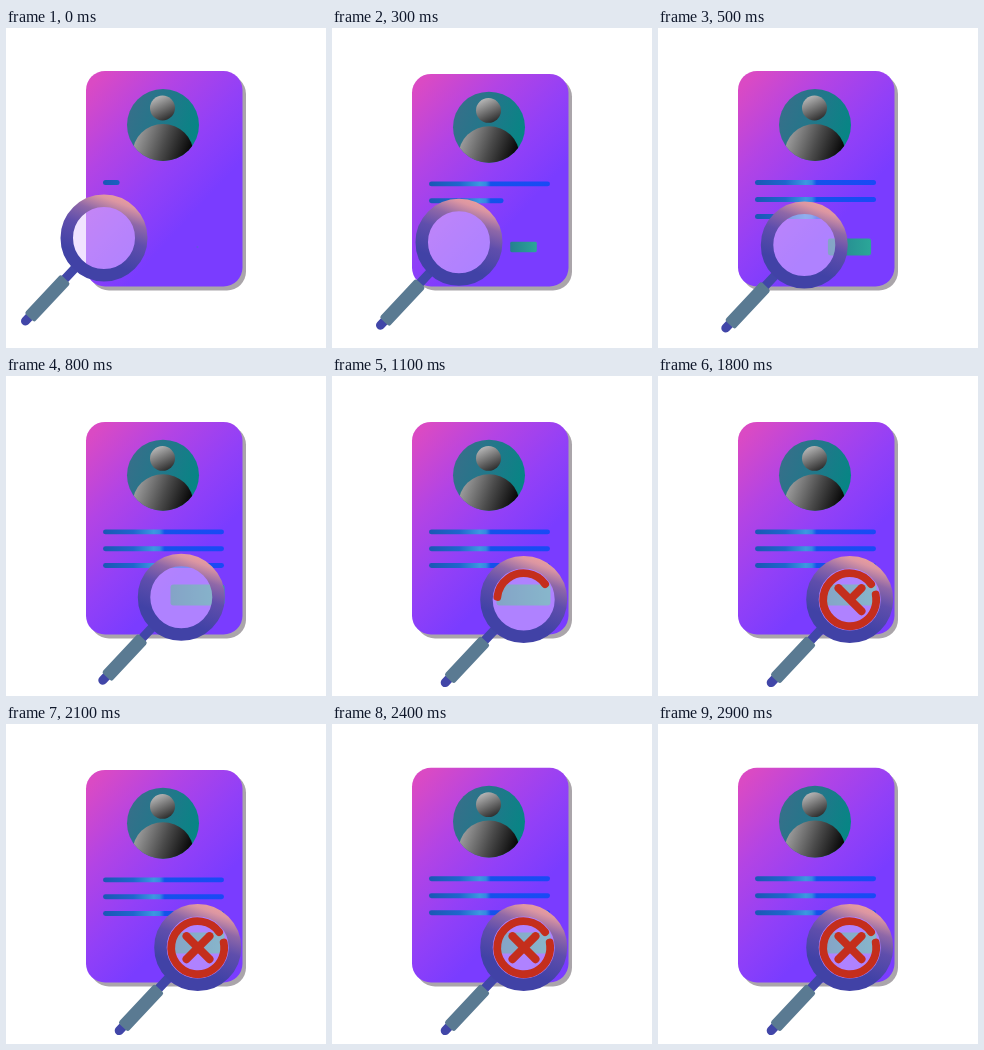
An HTML page with a canvas that plays this animation: 320x320 px, repeating every 3000 ms.

```html
<!DOCTYPE html>
<html lang="en">
<head>
<meta charset="utf-8">
<title>Profile check</title>
<style>
html, body { margin: 0; width: 100%; height: 100%; overflow: hidden; background: #fff; }
canvas { display: block; width: 100vw; height: 100vh; object-fit: contain; }
</style>
</head>
<body>
<canvas id="stage" width="320" height="320"></canvas>
<script>
const ctx = document.getElementById('stage').getContext('2d');
const LOOP = 3000, STEP = 100, TAU = Math.PI * 2;

const progress = (t, start, length) => Math.min(1, Math.max(0, (t - start) / length));
const mix = (a, b, p) => a + (b - a) * p;

function gradient(x0, y0, x1, y1, ...stops) {
  const g = ctx.createLinearGradient(x0, y0, x1, y1);
  stops.forEach(([at, color]) => g.addColorStop(at, color));
  return g;
}

function box(x, y, w, h, r, fill) {
  ctx.beginPath();
  ctx.roundRect(x, y, w, h, r);
  ctx.fillStyle = fill;
  ctx.fill();
}

function disc(x, y, r, fill) {
  ctx.beginPath();
  ctx.arc(x, y, r, 0, TAU);
  ctx.fillStyle = fill;
  ctx.fill();
}

function line(x0, y0, x1, y1, width, color) {
  ctx.beginPath();
  ctx.moveTo(x0, y0);
  ctx.lineTo(x1, y1);
  ctx.lineWidth = width;
  ctx.lineCap = 'round';
  ctx.strokeStyle = color;
  ctx.stroke();
}

// Draws the leading part p of a segment.
function growingLine(x0, y0, x1, y1, p, width, color) {
  if (p > 0) line(x0, y0, mix(x0, x1, p), mix(y0, y1, p), width, color);
}

// Quick dip, short hold, slower return.
function squash(t) {
  const u = (t % 500) / 500;
  if (u < 0.2) return u / 0.2;
  if (u <= 0.6) return 1;
  return u < 0.8 ? mix(1, 0.25, (u - 0.6) / 0.2) : mix(0.25, 0, (u - 0.8) / 0.2);
}

function drawAvatar() {
  ctx.save();
  disc(157, 97, 36, gradient(123, 85, 191, 109, [0, '#35708a'], [0.5, '#20788a'], [1, '#058684']));
  ctx.clip();
  ctx.beginPath();
  ctx.ellipse(157, 126, 30.5, 30, 0, 0, TAU);
  ctx.fillStyle = gradient(130, 110, 184, 130, [0, '#9c9c9c'], [0.5, '#4a4a4a'], [1, '#000']);
  ctx.fill();
  disc(156.5, 80, 12.5, gradient(151, 69, 162, 91, [0, '#b4b4b4'], [1, '#303030']));
  ctx.restore();
}

function drawCard(t) {
  ctx.save();
  ctx.translate(0, 258.5);
  ctx.scale(1, 1 - 0.0135 * squash(t));
  ctx.translate(0, -258.5);
  box(84, 47, 156, 215.5, 19, '#aaa5aa');
  box(80, 43, 156.5, 215.5, 19, gradient(80, 62, 200, 172,
    [0, '#da4ac4'], [0.35, '#b344e4'], [0.7, '#9240f7'], [1, '#7a3cff']));
  drawAvatar();
  const blue = gradient(97, 0, 218, 0,
    [0, '#1a58b4'], [0.25, '#1e66cc'], [0.42, '#3c98e0'], [0.47, '#3488e2'], [0.51, '#1452ea'], [1, '#1a49f6']);
  for (let i = 0; i < 3; i++) {
    const y = 154.5 + 17 * i;
    growingLine(99.5, y, 215.5, y, progress(t, -20 + 200 * i, 200), 5, blue);
  }
  ctx.restore();
}

function drawBadge(t) {
  const size = mix(0.03, 1, progress(t, 0, 630));
  ctx.save();
  ctx.translate(191.5, 219);
  ctx.scale(size, size);
  box(-27, -10.5, 54, 21, 3, gradient(-27, 0, 27, 0, [0, '#25808f'], [1, '#2ba798']));
  ctx.restore();
}

function drawHandle() {
  line(-27, 28, -78.5, 83, 9, '#4146a8');
  ctx.save();
  ctx.translate(-38.5, 41);
  ctx.rotate(Math.atan2(39, -36.5));
  box(0, -6.75, 53, 13.5, 2.5, '#5a7a92');
  ctx.restore();
}

function drawMagnifier(t) {
  const p = progress(t, 0, 970);
  ctx.save();
  ctx.translate(mix(98, 191.7, p), mix(210, 223.6, p));
  drawHandle();
  disc(0, 0, 32, 'rgba(228, 200, 255, 0.5)');
  ctx.beginPath();
  ctx.arc(0, 0, 37.25, 0, TAU);
  ctx.lineWidth = 12.5;
  ctx.strokeStyle = gradient(14, -46, -10, 20,
    [0, '#f0a29c'], [0.14, '#dc96a2'], [0.35, '#8f68a8'], [0.6, '#5f4eac'], [1, '#4142a6']);
  ctx.stroke();
  ctx.restore();
}

function drawCross(t) {
  const red = '#c42e1c', x = 192, y = 223.7, arm = 11.5;
  const arc = progress(t, 960, 340);
  if (arc > 0) {
    const start = -0.63;
    ctx.beginPath();
    ctx.arc(191.7, y, 26.5, start, start - arc * 5.85, true);
    ctx.lineWidth = 7.8;
    ctx.lineCap = 'round';
    ctx.strokeStyle = red;
    ctx.stroke();
  }
  growingLine(x - arm, y - arm, x + arm, y + arm, progress(t, 1300, 340), 8, red);
  growingLine(x + arm, y - arm, x - arm, y + arm, progress(t, 1640, 340), 8, red);
}

function frame() {
  const t = Math.floor((performance.now() % LOOP) / STEP) * STEP;
  ctx.fillStyle = '#fff';
  ctx.fillRect(0, 0, 320, 320);
  drawCard(t);
  drawBadge(t);
  drawMagnifier(t);
  drawCross(t);
  requestAnimationFrame(frame);
}
frame();
</script>
</body>
</html>
```
